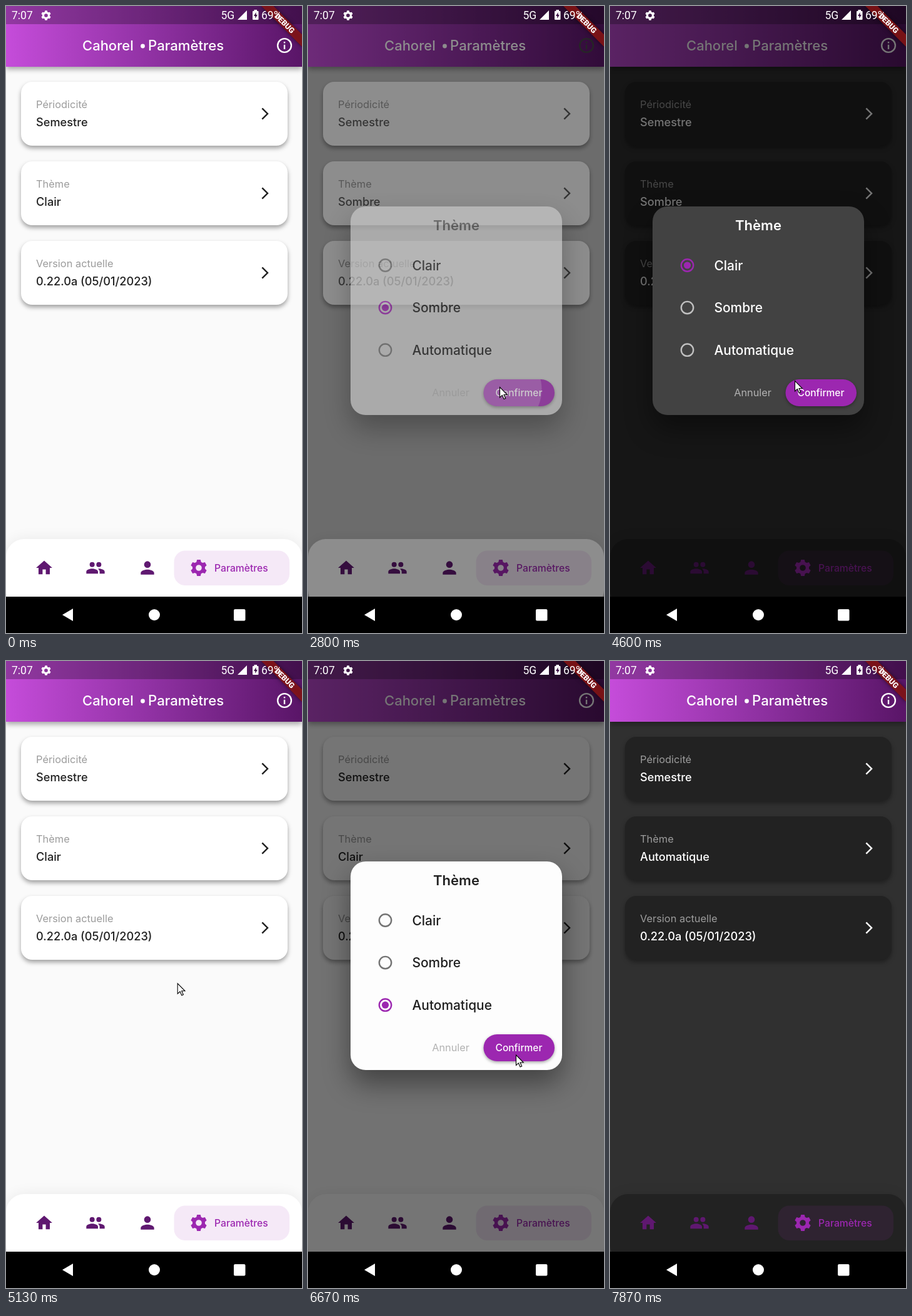
Recreate the animation shown at these times as an HTML page with a canvas. Size 473x1001 px, loop 8.19 s.

```html
<!DOCTYPE html>
<html lang="fr">
<head>
<meta charset="utf-8">
<title>Paramètres</title>
<style>
html, body { margin: 0; width: 100%; height: 100%; overflow: hidden; background: #000; }
canvas { display: block; width: 473px; height: 1001px; }
</style>
</head>
<body>
<canvas id="stage" width="473" height="1001"></canvas>
<script>
const W = 473, H = 1001, LOOP = 8190, STEP = 1000 / 15;
const FONT = 'Inter, "Open Sans", sans-serif';
const PURPLE = '#9c27b0', DEEP = '#5f1870';
const MODES = ['Clair', 'Sombre', 'Automatique'];
const screen = document.getElementById('stage').getContext('2d');
const layer = document.createElement('canvas');
layer.width = W;
layer.height = H;
const layerCtx = layer.getContext('2d');
let g = screen;

// Each visit to the theme dialog: times, choice before and after, tap position
const visits = [
  { open: 1135, pick: 1760, close: 2750, from: 0, to: 1, tap: [110, 307] },
  { open: 3795, pick: 4300, close: 4750, from: 1, to: 0, tap: [112, 310] },
  { open: 5550, pick: 6100, close: 6780, from: 0, to: 2, tap: [200, 305] }
];

// Pointer stops: time, x, y
const pointer = [
  [800, 24, 387], [1000, 105, 307], [1266, 105, 307], [1700, 130, 476],
  [1870, 130, 476], [2550, 306, 608], [2930, 306, 608], [3650, 110, 310],
  [3800, 110, 310], [4070, 130, 408], [4270, 130, 408], [4600, 295, 598],
  [4700, 306, 606], [4950, 306, 606], [5450, 200, 305], [5560, 200, 310],
  [5667, 215, 450], [6000, 190, 545], [6170, 190, 545], [6600, 332, 628],
  [6933, 332, 633], [7667, 134, 912], [7800, 76, 967]
];

const clamp = v => Math.max(0, Math.min(1, v));
const mix = (a, b, p) => a + (b - a) * p;
const smooth = p => p * p * (3 - 2 * p);
const grey = v => { const n = Math.round(v); return `rgb(${n},${n},${n})`; };
const icon = d => new Path2D(d);

const HOME = icon('M10 20v-6h4v6h5v-8h3L12 3 2 12h3v8z');
const PERSON = icon('M8 8a4 4 0 1 0 8 0a4 4 0 1 0-8 0zM12 14c-2.67 0-8 1.34-8 4v2h16v-2c0-2.66-5.33-4-8-4z');
const GROUP = icon('M13 8a3 3 0 1 0 6 0a3 3 0 1 0-6 0zM5 8a3 3 0 1 0 6 0a3 3 0 1 0-6 0z' +
  'M8 13c-2.33 0-7 1.17-7 3.5V19h14v-2.5c0-2.33-4.67-3.5-7-3.5z' +
  'M16 13l-1 .05c1.16.84 2 1.97 2 3.45V19h6v-2.5c0-2.33-4.67-3.5-7-3.5z');
const CHEVRON = icon('M6.2 20.2L8 22 18 12 8 2 6.2 3.8 14.4 12z');
const BOLT = icon('M5.6 3.6L2 9.4h2.3v4L7.8 7.6H5.6z');
const ARROW = icon('M0 0V16.5L3.9 12.9L6.6 19L9.2 17.9L6.5 12H11.8z');
const GEAR = makeGear();

function makeGear() {
  const p = new Path2D();
  for (let i = 0; i < 6; i++) {
    const a = i * Math.PI / 3 - Math.PI / 2;
    for (const [da, r] of [[-.38, 7.55], [-.21, 9.95], [.21, 9.95], [.38, 7.55]])
      p.lineTo(12 + r * Math.cos(a + da), 12 + r * Math.sin(a + da));
  }
  p.closePath();
  p.moveTo(15.6, 12);
  p.arc(12, 12, 3.6, 0, 7);
  return p;
}

function drawIcon(path, cx, cy, size, color) {
  g.save();
  g.translate(cx - size / 2, cy - size / 2);
  g.scale(size / 24, size / 24);
  g.fillStyle = color;
  g.fill(path, 'evenodd');
  g.restore();
}

function text(s, x, y, size, color, weight = 500, align = 'left', family = FONT) {
  g.font = `${weight} ${size}px ${family}`;
  g.textAlign = align;
  g.fillStyle = color;
  g.fillText(s, x, y);
}

function box(x, y, w, h, r, color, shadow) {
  g.save();
  if (shadow) [g.shadowColor, g.shadowBlur, g.shadowOffsetY] = shadow;
  g.fillStyle = color;
  g.beginPath();
  g.roundRect(x, y, w, h, r);
  g.fill();
  g.restore();
}

function disc(x, y, r, color) {
  g.fillStyle = color;
  g.beginPath();
  g.arc(x, y, r, 0, 7);
  g.fill();
}

function ring(x, y, r, width, color) {
  g.strokeStyle = color;
  g.lineWidth = width;
  g.beginPath();
  g.arc(x, y, r, 0, 7);
  g.stroke();
}

function splash(x, y, w, h, r, cx, cy, radius, color) {
  g.save();
  g.beginPath();
  g.roundRect(x, y, w, h, r);
  g.clip();
  disc(cx, cy, radius, color);
  g.restore();
}

function themeAt(t) {
  let dark = 0;
  for (const v of visits) dark = mix(dark, v.to ? 1 : 0, clamp((t - v.close) / 185));
  return dark;
}

function card(y, label, value, ink, isDark) {
  box(24, y, 426, 102, 18, isDark ? '#222' : '#fff', ['rgba(0,0,0,.36)', 7, 4]);
  text(label, 48, y + 42, 16.4, '#9c9c9c', 400);
  text(value, 48, y + 71, 18.2, ink);
  drawIcon(CHEVRON, 414, y + 51, 23, ink);
}

function header(dark) {
  const fill = g.createLinearGradient(0, 0, W, 0);
  fill.addColorStop(0, '#c54cda');
  fill.addColorStop(.5, '#8f31a2');
  fill.addColorStop(1, '#591567');
  box(0, 0, W, 97, 0, fill, ['rgba(0,0,0,.34)', 8, 4]);
  box(0, 0, W, 29, 0, 'rgba(0,0,0,.26)');
  text('Cahorel', 122, 71, 22, '#fff');
  disc(218.5, 64, 3.4, '#fff');
  text('Paramètres', 227, 71, 22.2, '#fff');
  const tone = dark > 0 && dark < 1 ? grey(255 * dark) : '#fff';
  ring(445, 63, 10.9, 2.4, tone);
  box(443.8, 61.8, 2.4, 7.2, 0, tone);
  box(443.8, 57, 2.4, 2.4, 0, tone);
}

function navBar(isDark) {
  box(0, 851, W, 110, 28.8, isDark ? '#222' : '#fff', ['rgba(0,0,0,.07)', 22, 0]);
  box(268.5, 869.5, 184.5, 55.5, 18, 'rgba(156,39,176,.1)');
  drawIcon(HOME, 61, 897, 31, DEEP);
  drawIcon(GROUP, 143, 897, 32, DEEP);
  drawIcon(PERSON, 226, 897, 32, DEEP);
  drawIcon(GEAR, 308, 897, 32, PURPLE);
  text('Paramètres', 333, 903, 15.7, PURPLE);
}

function page(t, dark) {
  const isDark = dark >= .5;
  const ink = grey(mix(33, 255, dark));
  let mode = 0;
  for (const v of visits) if (t >= v.close) mode = v.to;
  box(0, 0, W, H, 0, grey(mix(250, 48, dark)));
  card(121, 'Périodicité', 'Semestre', ink, isDark);
  card(248, 'Thème', MODES[mode], ink, isDark);
  card(375, 'Version actuelle', '0.22.0a (05/01/2023)', ink, isDark);
  for (const v of visits) {
    const age = t - v.open;
    if (age < 0 || age > 450) continue;
    const a = .06 * (1 - clamp((age - 200) / 250));
    const tone = isDark ? '255,255,255' : '0,0,0';
    splash(24, 248, 426, 102, 18, ...v.tap, Math.min(420, age * 1.2), `rgba(${tone},${a})`);
  }
  navBar(isDark);
  header(dark);
}

function dialogBody(t, v, dark) {
  const isDark = dark >= .5;
  const ink = isDark ? '#fff' : '#1f1f1f';
  const idle = isDark ? '#c0c0c0' : '#737373';
  box(68, 320, 338, 333, 24, grey(mix(253, 66, dark)), ['rgba(0,0,0,.42)', 44, 22]);
  text('Thème', 237, 358, 22, grey(mix(33, 255, dark)), 600, 'center');
  MODES.forEach((name, i) => {
    const y = 414 + i * 67.6;
    const p = clamp((t - v.pick) / 150);
    const on = i === v.to ? p : i === v.from ? 1 - p : 0;
    ring(123.5, y, 9.7, 2.4, on > .5 ? PURPLE : idle);
    if (on > 0) disc(123.5, y, 5.6 * on, PURPLE);
    text(name, 166.5, y + 7.6, 20.9, ink);
  });
  text('Annuler', 228, 623, 16.3, '#b2b2b2', 400, 'center');
  box(280.5, 596, 113.5, 43, 21.5, PURPLE, ['rgba(0,0,0,.35)', 5, 2]);
  text('Confirmer', 337, 623, 15.5, '#fff', 500, 'center');
  const age = t - v.close + 100;
  if (age > 0) splash(280.5, 596, 113.5, 43, 21.5, 306, 612, age * .45, 'rgba(255,255,255,.22)');
}

function dialog(t, v, dark) {
  if (t <= v.open || t >= v.close + 150) return;
  const shown = clamp((t - v.open) / 150);
  const left = 1 - clamp((t - v.close) / 150);
  const closing = t > v.close;
  const fade = closing ? 1 - (1 - left) ** 1.6 : smooth(shown) ** .5;
  box(0, 0, W, 943, 0, `rgba(0,0,0,${.54 * fade})`);
  g = layerCtx;
  g.clearRect(0, 0, W, H);
  dialogBody(t, v, dark);
  g = screen;
  g.globalAlpha = closing ? left : 1 - (1 - shown) ** 2;
  g.drawImage(layer, 0, 0);
  g.globalAlpha = 1;
}

function banner() {
  g.save();
  g.translate(W, 0);
  g.rotate(Math.PI / 4);
  g.globalAlpha = .5;
  box(-46, 32.2, 92, 13.8, 0, '#000', ['#000', 6, 0]);
  g.globalAlpha = 1;
  box(-46, 32.2, 92, 13.8, 0, 'rgba(183,28,28,.63)');
  text('DEBUG', 0, 43.4, 12.2, '#fff', 900, 'center', 'Roboto, sans-serif');
  g.restore();
}

function poly(...points) {
  g.fillStyle = '#fff';
  g.beginPath();
  for (const [x, y] of points) g.lineTo(x, y);
  g.fill();
}

function systemBars() {
  const put = (s, x) => text(s, x, 21, 17.5, '#fff', 400, 'left', 'Roboto, sans-serif');
  put('7:07', 9);
  drawIcon(GEAR, 64, 15, 19, '#fff');
  put('5G', 343.5);
  poly([370, 22], [385, 22], [385, 7]);
  box(394, 8, 9.5, 14, 1, '#fff');
  box(396.5, 6, 4.5, 3, 0, '#fff');
  g.save();
  g.translate(394, 6.5);
  g.fillStyle = '#3a1043';
  g.fill(BOLT);
  g.restore();
  put('69%', 408);
  box(0, 943, W, 58, 0, '#000');
  poly([90, 972], [107, 962], [107, 982]);
  disc(237, 972, 9, '#fff');
  box(364, 963, 18.5, 18.5, 2, '#fff');
}

function drawPointer(t) {
  if (t < 799 || t > 7830) return;
  let i = 0;
  while (i < pointer.length - 2 && t > pointer[i + 1][0]) i++;
  const [t0, x0, y0] = pointer[i], [t1, x1, y1] = pointer[i + 1];
  const p = smooth(clamp((t - t0) / (t1 - t0)));
  g.save();
  g.translate(mix(x0, x1, p) + .5, mix(y0, y1, p) + .5);
  g.fillStyle = '#fff';
  g.strokeStyle = '#000';
  g.lineWidth = 1.1;
  g.fill(ARROW);
  g.stroke(ARROW);
  g.restore();
}

function stepTime(t) {
  let n = Math.floor(t / STEP) + 1;
  while (n > 0 && Math.round(n * STEP / 10) * 10 > t) n--;
  return n * STEP;
}

function render(t) {
  const dark = themeAt(t);
  page(t, dark);
  for (const v of visits) dialog(t, v, dark);
  banner();
  systemBars();
  drawPointer(t);
}

let start;
function tick(now) {
  start ??= now;
  render(stepTime(Math.max(0, now - start) % LOOP));
  requestAnimationFrame(tick);
}
requestAnimationFrame(tick);
</script>
</body>
</html>
```
